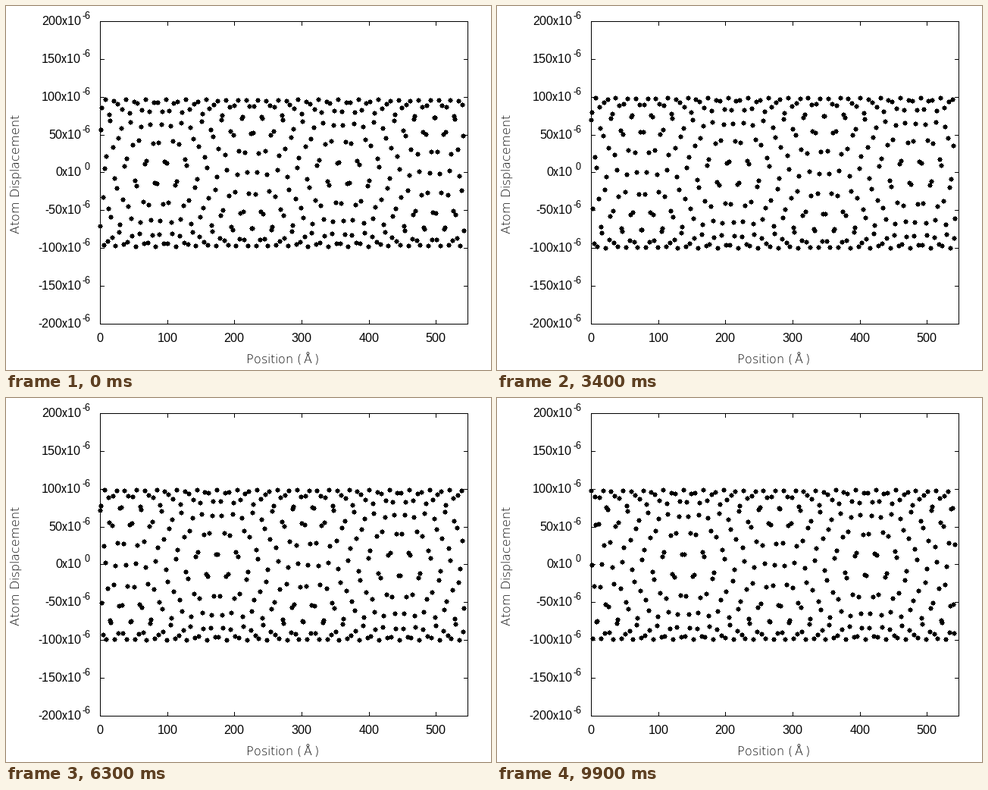
A matplotlib script that plays this animation: 640 by 480 pixels, repeating every 10000 ms.

```python
import numpy as np
import matplotlib.pyplot as plt
from matplotlib.animation import FuncAnimation
from matplotlib.collections import LineCollection, PolyCollection

# Whole-pixel hinting keeps the small text crisp
plt.rcParams["text.hinting"] = "default"
plt.rcParams["text.hinting_factor"] = 1

W, H, DPI = 640, 480, 80
PX = 72 / DPI                                # one pixel in points
LEFT, RIGHT, TOP, BOTTOM = 124, 609, 20, 419
X_MAX, Y_MAX = 547, 200                      # angstrom, 1e-6
FRAMES, INTERVAL = 100, 100

# Chain of atoms carrying a travelling wave with a weak reflection
ATOMS, SPACING = 400, 1.3575
STEP = 2 * np.pi * 91 / ATOMS
AMP, ECHO, ECHO_PHASE = 98.2, 0.0165, np.radians(130)
PHASE, OMEGA = np.radians(-45.6), np.radians(161.458)
ZERO_Y = 219.9                               # pixel row of zero displacement


def px_x(x):
    return np.floor(LEFT + np.asarray(x) * (RIGHT - LEFT) / X_MAX + 0.5)


def px_y(y, zero=(TOP + BOTTOM) / 2):
    scale = (BOTTOM - TOP) / (2 * Y_MAX)
    return np.ceil(zero - np.asarray(y) * scale - 0.5)


def disc():
    """Outline of a 7 px dot built from whole pixels."""
    q = np.array([(0.5, 3.5), (0.5, 2.5), (2.5, 2.5), (2.5, 0.5), (3.5, 0.5)])
    right = np.vstack([q, q[::-1] * (1, -1)])
    return np.vstack([right, right[::-1] * (-1, 1)]) + 0.5


fig = plt.figure(figsize=(W / DPI, H / DPI), dpi=DPI, facecolor="white")
ax = fig.add_axes([0, 0, 1, 1])
ax.set_xlim(0, W)
ax.set_ylim(H, 0)
ax.axis("off")


def label(x, y, s, size=16, font="Liberation Sans", **kw):
    kw.setdefault("ha", "center")
    kw.setdefault("va", "baseline")
    ax.text(x, y, s, fontsize=size * PX, family=font, **kw)


lines = [[(LEFT, TOP), (RIGHT, TOP), (RIGHT, BOTTOM), (LEFT, BOTTOM), (LEFT, TOP)]]

for v in range(0, 501, 100):
    x = float(px_x(v))
    lines += [[(x, BOTTOM), (x, BOTTOM - 5)], [(x, TOP), (x, TOP + 5)]]
    label(x, 442.8, str(v))

for v in range(-200, 201, 50):
    y = float(px_y(v))
    lines += [[(LEFT, y), (LEFT + 5, y)], [(RIGHT, y), (RIGHT - 5, y)]]
    label(99, y + 5.2, f"{v}x10", ha="right")
    label(111, y - 2.8, "-6" if v else "0", size=12.8, ha="right")

ax.add_collection(LineCollection([np.array(p) + 0.5 for p in lines],
                                 colors="black", linewidths=PX, snap=False,
                                 antialiaseds=False, capstyle="projecting"))

title = dict(font="DejaVu Sans", weight=200)
label(365, 470.5, "Position (\u2009Å\u2009)", **title)
label(18, 221.5, "Atom Displacement", rotation=90, rotation_mode="anchor", **title)

n = np.arange(ATOMS)
atom_x = px_x(n * SPACING)
DISC = disc()
dots = PolyCollection([], facecolors="black", edgecolors="none", snap=False,
                      antialiaseds=False, zorder=3)
ax.add_collection(dots, autolim=False)


def update(i):
    phase = PHASE + OMEGA * i
    wave = np.sin(STEP * n + phase) + ECHO * np.sin(STEP * n - phase + ECHO_PHASE)
    centers = np.column_stack([atom_x, px_y(AMP * wave, ZERO_Y)])
    dots.set_verts(centers[:, None, :] + DISC)
    return dots,


anim = FuncAnimation(fig, update, frames=FRAMES, interval=INTERVAL, repeat=True,
                     repeat_delay=0)
plt.show()
```
